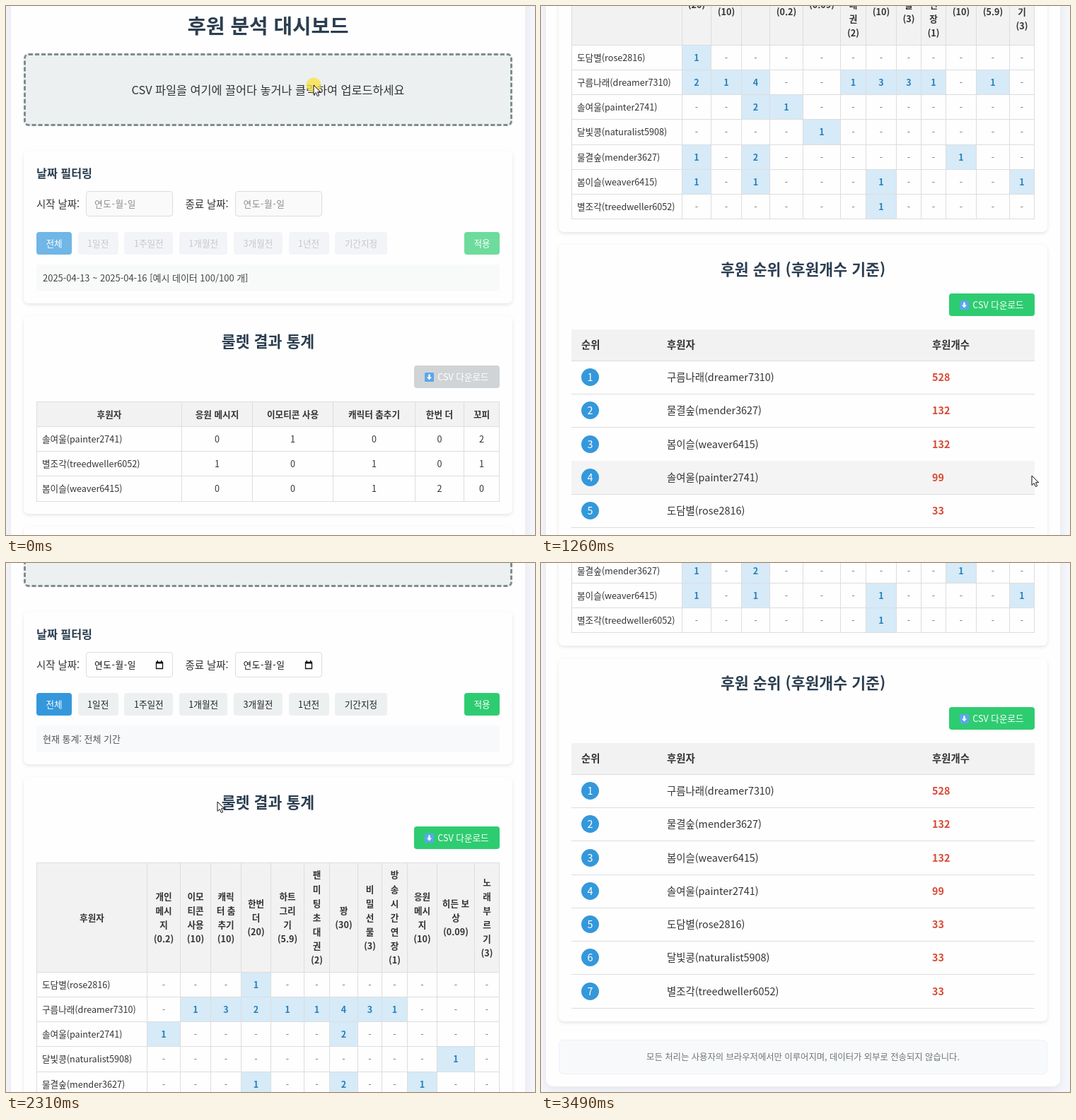
An HTML page that plays this animation: 748 by 749 pixels, repeating every 3550 ms.

```html
<!DOCTYPE html>
<html lang="ko">
<head>
<meta charset="utf-8">
<title>후원 분석 대시보드</title>
<style>
html, body { margin: 0; width: 100%; height: 100%; overflow: hidden; background: #f4f6fb; }
#stage { position: fixed; left: 0; top: 0; width: 748px; height: 749px; overflow: hidden;
  font: 12.6px "Noto Sans CJK KR", "Noto Sans CJK JP", "Noto Sans", sans-serif; color: #333; }
#page { position: absolute; left: 0; top: 0; width: 748px; height: 1700px; will-change: transform; }
.box { position: absolute; box-sizing: border-box; display: flex; align-items: center;
  justify-content: center; text-align: center; white-space: pre-line; line-height: 20.16px; }
.left { justify-content: flex-start; white-space: pre; }
.main { background: #fefefe; border-radius: 10px; box-shadow: 0 4px 14px rgba(0,0,0,.07); }
.card { background: #fefefe; border-radius: 7px; box-shadow: 0 2px 5px rgba(0,0,0,.1); }
.drop { background: #ecf0f1; border: 3px dashed #7f8c8d; border-radius: 7px; font-size: 16.3px; }
.h1, .h2, .h3 { color: #2c3e50; font-weight: 700; }
.h1 { font-size: 28.8px; }
.h2 { font-size: 21.6px; }
.h3 { font-size: 16.2px; }
.label { font-size: 14.4px; font-weight: 500; }
.date { border: 1px solid #ddd; border-radius: 4px; padding-left: 11px; letter-spacing: .65px; color: #111; background: #fefefe; }
.date svg { position: absolute; right: 12px; top: 11px; }
.btn { background: #ecf0f1; border-radius: 4px; color: #222; font-weight: 500; }
.blue { background: #3498db; color: #fff; }
.green { background: #2ecc71; color: #fff; gap: 5px; }
.info { background: #f8f9fa; border-radius: 4px; padding-left: 9px; font-size: 12.96px; color: #555; }
.cell { border: 1px solid #ddd; }
.name { padding-left: 7px; }
.head { background: #f2f2f2; font-weight: 700; }
.none { color: #777; }
.hover { background: #f4f4f4; }
.value { background: #d6eaf8; color: #2980b9; font-weight: 700; }
.aim { background: #e3f2fd; }
.big { font-size: 14.4px; }
.line { border-bottom: 1px solid #ddd; }
.rank { border-radius: 50%; background: #3498db; color: #fff; }
.count { color: #d94a35; font-weight: 700; }
.foot { background: #f8f9fa; border: 1px solid #f0f1f3; border-radius: 7px; font-size: 12.33px; color: #6b7678; }
.demo .date { color: #888; background: #fafafa; }
.demo .date svg { display: none; }
.demo .btn { background: #f3f4f8; color: #c4c8cc; }
.demo .blue { background: #70b6e6; color: #fff; }
.demo .green { background: #6ddb9c; color: #fff; }
.demo .csv { background: #d0d4d6; }
.demo .info { background: #f8faf9; color: #444; }
.demo .real, .sample { display: none; }
.demo .sample { display: block; }
.demo #ranking { transform: translateY(-261px); }
#cursor { position: absolute; left: 0; top: 0; overflow: visible; }
</style>
</head>
<body>
<div id="stage">
  <div id="page" class="demo"></div>
  <svg id="cursor" width="1" height="1">
    <circle id="click" r="10.5" fill="#fbe13c" opacity=".75"/>
    <path id="arrow" d="M0 0V13.5L3.2 10.6L5.4 15.6L7.7 14.6L5.5 9.7H9.6Z" fill="#fff" stroke="#111"/>
    <path id="move" d="M0-9L3.5-5.5H1.5V-1.5H5.5V-3.5L9 0L5.5 3.5V1.5H1.5V5.5H3.5L0 9L-3.5 5.5H-1.5V1.5H-5.5V3.5L-9 0L-5.5-3.5V-1.5H-1.5V-5.5H-3.5Z" fill="#fff" stroke="#111"/>
  </svg>
</div>
<script>
const $ = id => document.getElementById(id);
const page = $('page');

function add(parent, cls, x, y, w, h, html = '') {
  const el = document.createElement('div');
  el.className = 'box ' + cls;
  el.style.cssText = `left:${x}px;top:${y}px;width:${w}px;height:${h}px`;
  el.innerHTML = html;
  parent.append(el);
  return el;
}
function group(cls) {
  const el = document.createElement('div');
  el.className = cls;
  page.append(el);
  return el;
}
// Neighbouring cells share one border.
const cell = (parent, cls, x, y, w, h, text) => {
  const l = Math.round(x), t = Math.round(y);
  return add(parent, 'cell ' + cls, l, t, Math.round(x + w) - l + 1, Math.round(y + h) - t + 1, text);
};
const csvButton = (parent, y) => add(parent, 'btn green csv', 577, y, 121, 32.4,
  `<svg width="13" height="13"><rect width="13" height="13" rx="1.5" fill="#5aa6ec"/>
  <path d="M5.3 2.5h2.4v4h2.3L6.5 10.5 3 6.5h2.3z" fill="#fff"/></svg><span>CSV 다운로드</span>`);

const people = ['도담별(rose2816)', '구름나래(dreamer7310)', '솔여울(painter2741)', '달빛콩(naturalist5908)',
  '물결숲(mender3627)', '봄이슬(weaver6415)', '별조각(treedweller6052)'];
// Prize: header lines, width, result per person
const prizes = [
  ['한번 더 (20)', 41.4, '12--11-'], ['이모 티콘 사용 (10)', 43, '-1-----'],
  ['꽝 (30)', 39.7, '-42-21-'], ['개인 메시 지 (0.2)', 47.3, '--1----'],
  ['히든_보 상 (0.09)', 52.7, '---1---'], ['팬 미 팅 초 대 권 (2)', 36.4, '-1-----'],
  ['캐릭 터_춤 추기 (10)', 43, '-3---11'], ['비 밀 선 물 (3)', 34.6, '-3-----'],
  ['방 송 시 간 연 장 (1)', 35.4, '-1-----'], ['응원 메시 지 (10)', 42.6, '----1--'],
  ['하트 그리 기 (5.9)', 46.8, '-1-----'], ['노 래 부 르 기 (3)', 35.1, '-----1-']];
const ROW = 35.15, TABLE = 560, BODY = 715;

add(page, 'main', 7, -60, 727, 1664);
add(page, 'h1', 25, 4, 691, 46, '후원 분석 대시보드');
add(page, 'drop', 25, 67, 691, 103, 'CSV 파일을 여기에 끌어다 놓거나 클릭하여 업로드하세요');

// Date filter
add(page, 'card', 25, 205, 691, 216);
add(page, 'left h3', 43, 222, 200, 28, '날짜 필터링');
[['시작 날짜:', 43], ['종료 날짜:', 253.6]].forEach(([text, x]) => {
  add(page, 'left label', x, 262, 66, 36, text);
  add(page, 'left date', x + 70, 262, 123, 36, `연도-월-일<svg width="12" height="13">
    <path d="M1.5 2.5h9v9h-9z" fill="none" stroke="#111" stroke-width="1.3"/><path d="M1 2h10v2.5H1zM2.5 0h1.5v2H2.5zM8 0h1.5v2H8z" fill="#111"/></svg>`);
});
let x = 43;
['전체', '1일전', '1주일전', '1개월전', '3개월전', '1년전', '기간지정'].forEach((text, i) => {
  const w = [50, 57, 68.8, 68.6, 68.6, 57, 73.4][i];
  add(page, 'btn' + (i ? '' : ' blue'), x, 320, w, 32.4, text);
  x += w + 8.7;
});
add(page, 'btn green', 648, 320, 50, 32.4, '적용');
const info = add(page, 'left info', 43, 366, 655, 38);

// Roulette statistics: sample table, then the loaded one
const sample = group('sample'), real = group('real');
add(sample, 'card', 25, 439, 691, 280);
add(real, 'card', 25, 439, 691, 541);
add(page, 'h2', 25, 456, 691, 36, '룰렛 결과 통계');
csvButton(page, 509);

x = 43;
[['후원자', 204.5], ['응원 메시지', 100, '010'], ['이모티콘 사용', 114.5, '100'], ['캐릭터 춤추기', 115.5, '011'],
 ['한번 더', 69, '002'], ['꼬피', 50.5, '210']].forEach(([title, w, values]) => {
  cell(sample, 'head', x, TABLE, w, ROW, title);
  [2, 6, 5].forEach((p, r) => cell(sample, values ? '' : 'left name', x, TABLE + ROW * (r + 1), w, ROW,
    values ? values[r] : people[p]));
  x += w;
});

const rouletteRows = people.map((name, r) => [cell(real, 'left name', 43, BODY + ROW * r, 156, ROW, name)]);
cell(real, 'head', 43, TABLE, 156, BODY - TABLE, '후원자');
const columns = prizes.map(([title, w, values]) => {
  const head = cell(real, 'head', 0, TABLE, w, BODY - TABLE, title.replace(/ /g, '\n').replace('_', ' '));
  const cells = [...values].map((v, r) => {
    const el = cell(real, v === '-' ? 'none' : 'value', 0, BODY + ROW * r, w, ROW, v);
    if (v === '-') rouletteRows[r].push(el);
    return el;
  });
  return { w, head, all: [head, ...cells] };
});

// Ranking
const ranking = group('');
ranking.id = 'ranking';
add(ranking, 'card', 25, 998, 691, 514);
add(ranking, 'h2', 25, 1014, 691, 36, '후원 순위 (후원개수 기준)');
csvButton(ranking, 1067);
add(ranking, 'head line', 43, 1118, 655, 45);
[['순위', 57], ['후원자', 178], ['후원개수', 553]].forEach(([text, left]) =>
  add(ranking, 'left big label head', left, 1119, 100, 40, text));
const rankRows = [1, 4, 5, 2, 0, 3, 6].map((p, i) => {
  const y = Math.round(1162 + 47.25 * i);
  const row = add(ranking, 'line', 43, y, 655, 48);
  add(ranking, 'big rank', 57, y + 11, 25, 25, i + 1);
  add(ranking, 'left big', 178, y, 300, 47, people[p]);
  add(ranking, 'left big count', 553, y, 100, 47, [528, 132, 132, 99, 33, 33, 33][i]);
  return row;
});
add(page, 'foot', 25, 1538, 691, 49, '모든 처리는 사용자의 브라우저에서만 이루어지며, 데이터가 외부로 전송되지 않습니다.');

// Path: step, scroll, cursor x, cursor y
const path = [[0, 0, 435, 112], [3, 0, 435, 113], [8, 0, 691, 666], [9, 131, 691, 666], [10, 256, 691, 666],
  [18, 660, 694, 665], [22, 863, 694, 665], [23, 863, 694, 665], [24, 832, 694, 665], [27, 200, 346, 440],
  [28, 200, 220, 440], [29, 200, 480, 440], [30, 200, 305, 440], [31, 200, 635, 440], [32, 180, 395, 440],
  [33, 136, 299, 338], [35, 60, 68, 276], [36, 60, 68, 276], [39, 231, 485, 452], [42, 231, 485, 452],
  [46, 640, 690, 690], [48, 845, 692, 752], [50, 863, 692, 790]];
const swaps = [[28, 0, 3], [30, 2, 6], [32, 4, 10]];
const LOADED = 4, RESET = 36, LOOP = 3550;

function locate(step) {
  const i = Math.max(1, path.findIndex(k => k[0] >= step));
  const a = path[i - 1], b = path[i], f = (step - a[0]) / (b[0] - a[0]);
  return [1, 2, 3].map(n => Math.round(a[n] + (b[n] - a[n]) * f));
}

function draw(step) {
  const [scroll, cx, cy] = locate(step);
  const loaded = step >= LOADED;
  page.className = loaded ? '' : 'demo';
  page.style.transform = `translateY(${-scroll}px)`;
  info.textContent = !loaded ? '2025-04-13 ~ 2025-04-16 [예시 데이터 100/100 개]'
    : '현재 통계: 전체 기간' + (step < RESET ? '' : ' (2025년 4월 13일 ~ 2025년 4월 16일) [30/30 개]');

  const order = columns.map((_, i) => i);
  if (step < RESET) for (const [at, a, b] of swaps)
    if (step >= at) [order[a], order[b]] = [order[b], order[a]];
  const overHeads = loaded && cy + scroll > TABLE && cy + scroll < BODY;
  let left = 199, aimed = false;
  for (const i of order) {
    const { w, head, all } = columns[i];
    const l = Math.round(left), r = Math.round(left + w);
    for (const el of all) {
      el.style.left = l + 'px';
      el.style.width = r - l + 1 + 'px';
    }
    const aim = overHeads && cx >= left && cx < left + w;
    head.classList.toggle('aim', aim);
    aimed = aimed || aim;
    left += w;
  }
  rouletteRows[2].forEach(el => el.classList.toggle('hover', step >= 9 && step < 14));
  rankRows[3].classList.toggle('hover', step >= 17 && step < 26);

  $('cursor').style.transform = `translate(${cx}px, ${cy}px)`;
  $('click').style.display = step < 3 || step === RESET ? '' : 'none';
  $('arrow').style.display = aimed ? 'none' : '';
  $('move').style.display = aimed ? '' : 'none';
}

function tick() {
  const t = performance.now() % LOOP;
  draw(t >= 3490 ? 50 : Math.floor(t / 70));
  requestAnimationFrame(tick);
}
tick();
</script>
</body>
</html>
```
